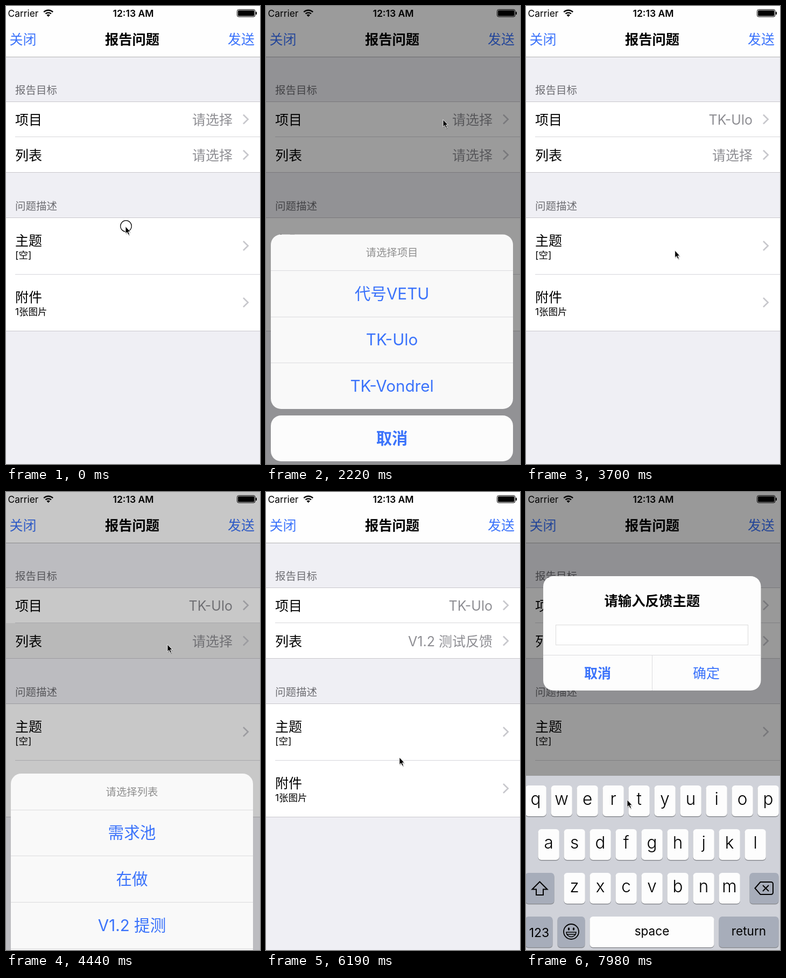
Animation of 472 by 849 pixels, one loop 8000 ms. Source, as an HTML page:

```html
<!DOCTYPE html>
<html lang="zh-CN">
<head>
<meta charset="utf-8">
<style>
html, body { margin: 0; width: 100%; height: 100%; overflow: hidden; background: #efeff4; }
svg { display: block; width: 472px; height: 849px; font-family: Inter, "Noto Sans CJK SC", "Noto Sans CJK", sans-serif; }
</style>
</head>
<body>
<svg id="stage" viewBox="0 0 472 849"></svg>
<script>
const BLUE = '#3b73fb', GRAY = '#8e8e93', HEAD = '#6d6d72', LINE = '#c8c7cc';
const PROJECT = 'TK-Ulo', LIST = 'V1.2 测试反馈';

// Text is placed by its vertical centre.
const text = (s, x, cy, size, o = {}) =>
  `<text x="${x}" y="${cy + .37 * size}" font-size="${size}" fill="${o.fill || '#000'}" ` +
  `text-anchor="${o.at || 'start'}" font-weight="${o.w || 400}"${o.id ? ` id="${o.id}"` : ''}>${s}</text>`;
const rect = (x, y, w, h, fill, r = 0, more = '') =>
  `<rect x="${x}" y="${y}" width="${w}" height="${h}" rx="${r}" fill="${fill}" ${more}/>`;
const hline = (x, y, w, fill = LINE) => rect(x, y, w, 1, fill);
const path = (d, width, color = '#000', fill = 'none') =>
  `<path d="${d}" fill="${fill}" stroke="${color}" stroke-width="${width}"/>`;
const chevron = y => path(`M441 ${y - 8.5}l8.7 8.5l-8.7 8.5`, 2.6, '#c7c7cc');
const mid = { at: 'middle' };

function statusBar() {
  return text('Carrier', 3.5, 13.5, 17.4) +
    text('12:13 AM', 236.5, 13.5, 17.6, { at: 'middle', w: 600 }) +
    path('M70.2 11.2a12.2 12.2 0 0 1 17 0M73.5 14.4a7.6 7.6 0 0 1 10.4 0', 2.4) +
    '<path d="M78.7 20l-3.2-3.3a4.6 4.6 0 0 1 6.4 0z"/>' +
    rect(429.5, 6.5, 33.5, 13.5, '#fff', 3, 'stroke="#000"') +
    rect(431, 8, 30.5, 10.5, '#000', 1.5) + rect(464, 10.5, 2, 5.5, '#000', 1);
}

function page() {
  return rect(0, 0, 472, 849, '#efeff4') + rect(0, 0, 472, 94.5, '#fefefe') + hline(0, 94, 472, '#b2b2b4') +
    statusBar() +
    text('关闭', 6.5, 61.5, 25, { fill: BLUE }) +
    text('报告问题', 234.5, 61.5, 25.3, { at: 'middle', w: 600 }) +
    text('发送', 462, 61.5, 25, { at: 'end', fill: BLUE }) +
    text('报告目标', 17, 155.5, 19.5, { fill: HEAD }) +
    text('问题描述', 17, 370.5, 19.5, { fill: HEAD }) +
    rect(0, 177, 472, 132, '#fff') + rect(0, 392, 472, 211, '#fff') +
    rect(0, 177, 472, 66, '#d9d9d9', 0, 'id="row0"') +
    rect(0, 243, 472, 66, '#d9d9d9', 0, 'id="row1"') +
    rect(0, 392, 472, 105.5, '#d9d9d9', 0, 'id="row2"') +
    [177, 308, 392, 602].map(y => hline(0, y, 472)).join('') +
    hline(17, 242, 455, '#d6d6da') + hline(17, 497, 455, '#d6d6da') +
    text('项目', 17, 210.5, 25) + text('', 421, 210.5, 25, { at: 'end', fill: GRAY, id: 'value0' }) +
    text('列表', 17, 276.5, 25) + text('', 421, 276.5, 25, { at: 'end', fill: GRAY, id: 'value1' }) +
    text('主题', 17, 435, 25) + text('[空]', 17, 462, 17.5) +
    text('附件', 17, 540, 25) + text('1张图片', 17, 567, 17.5) +
    [210, 276, 444.5, 549.5].map(chevron).join('');
}

const ROW = 85.7;
const sheetTop = n => 738 - 66.5 - ROW * n;

function sheet(id, title, options) {
  const top = sheetTop(options.length);
  return `<g id="${id}">` + rect(9, top, 450, 738 - top, '#f9f9f9', 19) +
    text(title, 234, top + 33.5, 19.4, { at: 'middle', fill: '#8f8f8f' }) +
    options.map((s, i) => {
      const y = top + 66.5 + ROW * i;
      return hline(9, Math.round(y), 450, '#dbdbde') + text(s, 234, y + ROW / 2, 29.6, { at: 'middle', fill: BLUE });
    }).join('') +
    rect(9, 750, 450, 85, '#fcfcfc', 19) +
    text('取消', 234, 792.5, 29.3, { at: 'middle', w: 600, fill: BLUE }) + '</g>';
}

function alertBox() {
  return '<g id="alert">' + rect(32, 156, 404.5, 212, '#fdfdfd', 19) +
    text('请输入反馈主题', 234.3, 202, 25.4, { at: 'middle', w: 600 }) +
    rect(55.5, 246.5, 357, 37, '#fff', 0, 'stroke="#dcdcdc"') +
    rect(63, 253, 2.4, 24, '#4468f0', 1, 'id="caret"') +
    hline(32, 302, 404.5, '#dbdbde') + rect(234, 302, 1, 66, '#dbdbde') +
    text('取消', 133, 335.5, 25, { at: 'middle', w: 600, fill: BLUE }) +
    text('确定', 335, 335.5, 25, { at: 'middle', fill: BLUE }) + '</g>';
}

function keyboard() {
  const key = (x, y, w, fill = '#fdfdfd') =>
    rect(x, y + 1.6, w, 57, '#8b8d92', 6) + rect(x, y, w, 57, fill, 6);
  const dark = (x, y, w) => key(x, y, w, '#a7adba');
  const letters = (s, x0, y) => [...s].map((c, i) => key(x0 + 48 * i, y, 39.3) +
    `<text x="${x0 + 48 * i + 19.6}" y="${y + 36}" font-size="31.5" font-weight="300" text-anchor="middle">${c}</text>`).join('');
  return '<g id="keys">' + rect(0, 526, 472, 323, '#d0d2d9') +
    letters('qwertyuiop', -1.5, 544) + letters('asdfghjkl', 22.5, 625) + letters('zxcvbnm', 70.5, 706) +
    dark(-1.5, 706, 54) + path('M25.5 722.5l14 14h-7.5v10.5h-13v-10.5h-7.5z', 2) +
    dark(415.5, 706, 54) + path('M425.5 734.5l10-11.5h20a3.5 3.5 0 0 1 3.5 3.5v16a3.5 3.5 0 0 1-3.5 3.5h-20zM440 729l11 11m0-11l-11 11', 2) +
    dark(-1.5, 787, 51) + text('123', 24.5, 816, 23, mid) +
    dark(58.5, 787, 51) + '<circle cx="84" cy="815" r="14" fill="none" stroke="#000" stroke-width="1.8"/>' +
    '<ellipse cx="79.5" cy="810" rx="1.7" ry="2.7"/><ellipse cx="88.5" cy="810" rx="1.7" ry="2.7"/>' +
    path('M75 816h18a9 8.5 0 0 1-18 0zM77 820h14', 1.6) +
    key(118.5, 787, 231) + text('space', 234, 814, 22.6, mid) +
    dark(358.5, 787, 111) + text('return', 414, 814, 22.6, mid) + '</g>';
}

stage.innerHTML = page() + rect(0, 0, 472, 849, '#000', 0, 'id="dim"') +
  sheet('sheet0', '请选择项目', ['代号VETU', PROJECT, 'TK-Vondrel']) +
  sheet('sheet1', '请选择列表', ['需求池', '在做', 'V1.2 提测', LIST, 'V1.2 测试完成']) +
  alertBox() + keyboard() +
  '<g id="pointer"><circle id="ring" cx="2" r="10.3" fill="none" stroke="#000" stroke-width="1.2"/>' +
  '<path d="M2 2.5v13.5l3-2.7 2.3 5 2.3-1-2.3-4.8h4z" opacity=".25"/>' +
  path('M1 .5v13.5l3-2.7 2.3 5 2.3-1-2.3-4.8h4z', .9, '#fff', '#000') + '</g>';

const $ = id => document.getElementById(id);
const clamp = v => Math.min(1, Math.max(0, v));
const ease = u => 1 - (1 - clamp(u)) ** 3;
const shown = (t, on, off = 1e9) => ease((t - on) / 450) * (1 - ease((t - off) / 400));

// Pointer stops: time, x, y
const STOPS = [
  [0, 221, 408], [150, 221, 408], [450, 238, 450], [890, 286, 548], [1190, 264, 392],
  [1480, 300, 345], [1620, 328, 210], [2230, 328, 210], [2800, 255, 604], [3300, 255, 604],
  [4120, 299, 282], [4730, 299, 282], [5165, 308, 602], [5900, 308, 602], [6490, 192, 392],
  [7700, 192, 392], [7970, 187, 570], [8100, 187, 570]
];
const PRESSES = [[0, 140], [1610, 1770], [2940, 3080], [4120, 4280], [5310, 5600], [6640, 6780]];
// Row highlights: pressed at, fading from
const ROWS = [[1760, 1890], [4280, 4330], [6780, 6830]];
// Sheets: opens, closes, number of options
const SHEETS = [[1890, 3050, 3], [4330, 5560, 5]];
const ALERT = 6830;

function pointerAt(t) {
  const i = STOPS.findIndex(s => s[0] > t);
  const [t0, x0, y0] = STOPS[i - 1], [t1, x1, y1] = STOPS[i];
  const u = (t - t0) / (t1 - t0), k = u * u * (3 - 2 * u);
  return [x0 + (x1 - x0) * k, y0 + (y1 - y0) * k];
}

function draw(t) {
  ROWS.forEach(([press, fade], i) =>
    $('row' + i).setAttribute('opacity', t < press ? 0 : 1 - clamp((t - fade) / 200)));
  $('value0').textContent = t < SHEETS[0][1] ? '请选择' : PROJECT;
  $('value1').textContent = t < SHEETS[1][1] ? '请选择' : LIST;

  const p = shown(t, ALERT);
  let dim = p;
  SHEETS.forEach(([on, off, n], i) => {
    const q = shown(t, on, off);
    dim = Math.max(dim, q);
    $('sheet' + i).setAttribute('transform', `translate(0 ${(1 - q) * (849 - sheetTop(n))})`);
  });
  $('dim').setAttribute('opacity', .4 * dim);
  $('alert').setAttribute('opacity', p);
  $('alert').setAttribute('transform', `translate(234.3 262) scale(${1.2 - .2 * p}) translate(-234.3 -262)`);
  $('caret').setAttribute('opacity', t < 7800 ? 1 : 0);
  $('keys').setAttribute('transform', `translate(0 ${(1 - p) * 323})`);

  $('pointer').setAttribute('transform', `translate(${pointerAt(t)})`);
  $('ring').setAttribute('opacity', PRESSES.some(([a, b]) => t >= a && t < b) ? 1 : 0);
}

// The screen refreshes in steps, as a screen recording does.
const STEP = 147.75, LEAD = 16;
const start = performance.now();
function tick() {
  const t = (performance.now() - start) % 8000;
  draw(Math.floor((t + LEAD) / STEP) * STEP);
  requestAnimationFrame(tick);
}
tick();
</script>
</body>
</html>
```
